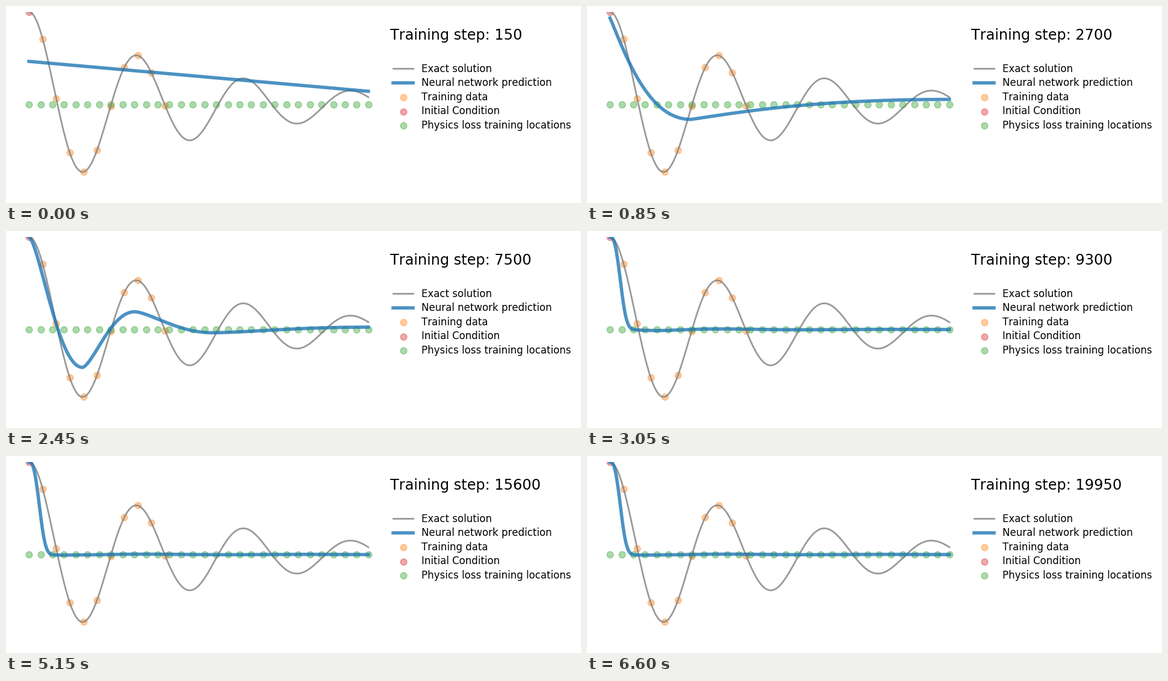
Recreate the animation shown at these times as a matplotlib script. Size 955 px wide and 328 px high, loop 6.65 s.

```python
import numpy as np
import matplotlib.pyplot as plt
from matplotlib.animation import FuncAnimation

W, H, DPI = 955, 328, 100
FRAMES, INTERVAL = 133, 50
STEPS_PER_FRAME = 150

plt.rcParams["text.kerning_factor"] = 6  # whole-pixel kerning


def oscillator(x, d=2.0, w0=20.0):
    """Under-damped harmonic oscillator released from u=1."""
    w = np.sqrt(w0**2 - d**2)
    phi = np.arctan(-d / w)
    return np.exp(-d * x) * np.cos(phi + w * x) / np.cos(phi)


def smoothstep(lo, hi, t):
    s = np.clip((t - lo) / (hi - lo), 0, 1)
    return s * s * (3 - 2 * s)


def mix(a, b, s):
    return a + (b - a) * s


def wave(x, skew, *turns):
    """Half-cosines between turning points; skew < 1 makes each start faster."""
    tx, tu = np.array(turns).T
    i = np.clip(np.searchsorted(tx, x, side="right") - 1, 0, len(tx) - 2)
    s = ((x - tx[i]) / (tx[i + 1] - tx[i]))**skew
    return mix(tu[i], tu[i + 1], (1 - np.cos(np.pi * s)) / 2)


x = np.linspace(0, 1, 500)
exact = oscillator(x)

# Learned shapes, by frame
stage_frames = [17, 31, 42, 49]
stages = [
    wave(x, 0.54, (0, 0.935), (0.238, -0.161), (1, 0.055)),
    wave(x, 0.70, (0, 1), (0.14, -0.458), (0.372, 0.085), (1, -0.029)),
    wave(x, 0.72, (0, 1), (0.153, -0.545), (0.318, 0.17), (0.7, -0.025), (1, -0.005)),
    wave(x, 0.74, (0, 1), (0.158, -0.416), (0.312, 0.195), (0.544, -0.036), (1, 0.026)),
]

# Final failure: a sharp drop from the initial condition to zero
collapsed = (np.exp(-(x / 0.0362)**2.7)
             - 0.008 * np.exp(-x / 0.45) * np.sin(2 * np.pi * x / 0.46))


def prediction(frame):
    pos = np.interp(frame, stage_frames, range(len(stages)))
    i = min(int(pos), len(stages) - 2)
    learned = mix(stages[i], stages[i + 1], pos - i)
    line = 0.466 + 0.05 * frame - (0.323 + 0.13 * frame) * x
    u = mix(line, learned, smoothstep(3, 15, frame))
    return mix(u, collapsed, smoothstep(48, 62, frame))


fig = plt.figure(figsize=(W / DPI, H / DPI), dpi=DPI, facecolor="white")
ax = fig.add_axes([10 / W, 10 / H, 620 / W, 308 / H])
ax.set_xlim(-0.05, 1.05)
ax.set_ylim(-1, 1)
ax.axis("off")

ax.plot(x, exact, color="grey", lw=2, alpha=0.8, label="Exact solution")
pred, = ax.plot(x, prediction(0), color="tab:blue", lw=4, alpha=0.8,
                label="Neural network prediction")


def dots(xs, ys, color, label):
    ax.scatter(xs, ys, s=60, color=color, alpha=0.4, label=label)


dots(x[20:220:20], exact[20:220:20], "tab:orange", "Training data")
dots([0], [1], "tab:red", "Initial Condition")
dots(np.linspace(0, 1, 30), np.zeros(30), "tab:green",
     "Physics loss training locations")

ax.legend(loc=(1.01, 0.336), frameon=False, fontsize="large", labelspacing=0.33)
title = ax.text(1.065, 0.7, "", fontsize="xx-large", color="k")


def update(frame):
    pred.set_ydata(prediction(frame))
    title.set_text(f"Training step: {STEPS_PER_FRAME * (frame + 1)}")
    return pred, title


anim = FuncAnimation(fig, update, frames=FRAMES, interval=INTERVAL, repeat=True)
plt.show()
```
